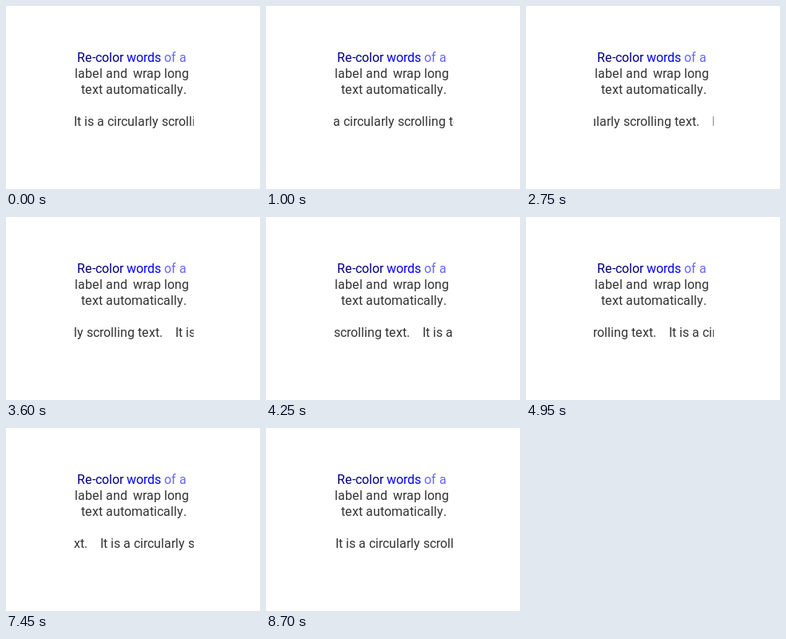
Animation, 318 px wide and 229 px high, one loop 8.75 s. Source, as an HTML page:

```html
<!DOCTYPE html>
<html lang="en">
<head>
<meta charset="utf-8">
<title>Label demo</title>
<style>
  html, body { margin: 0; width: 100%; height: 100%; overflow: hidden; background: #fff; }
  svg { display: block; width: 100%; height: 100%; }
  text { font: 16px Roboto, sans-serif; white-space: pre; }
</style>
</head>
<body>
<svg viewBox="0 0 318 229">
  <clipPath id="window"><rect x="85" y="134" width="150" height="24"/></clipPath>
  <g id="label"></g>
  <g clip-path="url(#window)"><g id="ticker"></g></g>
</svg>
<script>
const LOOP = 8750, HOLD = 250, STEP = 50;
const SPEED = 0.0246, LEAD = 5.715;   // px per ms, px
const INK = '#333333';
const label = document.getElementById('label');
const ticker = document.getElementById('ticker');
const pen = document.createElement('canvas').getContext('2d');
pen.font = '1024px Roboto, sans-serif';

// Bitmap-font advance: stored in sixteenths, then rounded to a whole pixel.
function advance(ch) {
  const width = pen.measureText(ch).width / 64;
  return Math.round(Math.round(width * 16) / 16);
}

// Sets a run glyph by glyph and returns where it ends.
function addText(parent, str, x, y, fill = INK) {
  const el = document.createElementNS('http://www.w3.org/2000/svg', 'text');
  const xs = [];
  for (const ch of str) {
    xs.push(x);
    x += advance(ch);
  }
  el.setAttribute('x', xs.join(' '));
  el.setAttribute('y', y);
  el.setAttribute('fill', fill);
  el.textContent = str;
  parent.append(el);
  return x;
}

let x = addText(label, 'Re-color ', 89, 70, '#000080');
x = addText(label, 'words ', x, 70, '#0000ff');
addText(label, 'of a', x, 70, '#6666ff');
addText(label, 'label and', 86, 90);
addText(label, 'wrap long', 159, 90);
addText(label, 'text automatically.', 94, 110);

const message = 'It is a circularly scrolling text.    ';
addText(ticker, message, addText(ticker, message, 85, 150), 150);

function shiftAt(ms) {
  let t = Math.floor(ms / STEP) * STEP;
  if (t < HOLD) return 0;
  // two brief stalls
  for (const stall of [850, 1250]) if (t > stall && t < stall + 150) t = stall;
  return Math.floor(LEAD + t * SPEED);
}

function draw(ms) {
  ticker.setAttribute('transform', `translate(${-shiftAt(ms % LOOP)} 0)`);
}

const start = performance.now();
function tick() {
  draw(performance.now() - start);
  requestAnimationFrame(tick);
}
tick();
</script>
</body>
</html>
```
